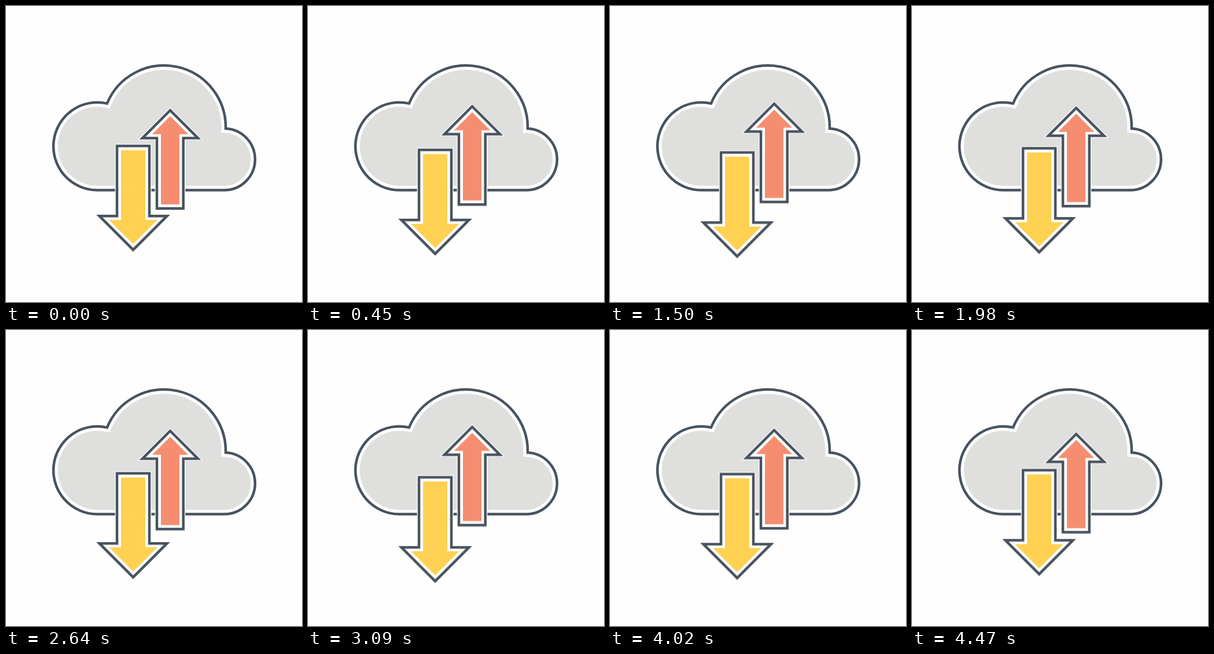
Write an HTML page without scripts that moves like this. It is 512 by 512 pixels and loops after 4500 ms.

```html
<!DOCTYPE html>
<html lang="en">
<head>
<meta charset="utf-8">
<title>Cloud transfer</title>
<style>
  html, body { margin: 0; width: 100%; height: 100%; overflow: hidden; background: #fefefe; }
  svg { display: block; width: 100%; height: 100%; }
  .line { fill: none; stroke: #48535e; stroke-width: 4.5; }
  .halo { fill: #fefefe; stroke: #fefefe; stroke-width: 7; }
  .cloud { fill: #dfe0de; stroke: #fefefe; stroke-width: 15; }
  .arrow { animation: drift 1125ms linear infinite alternate; }
  .down { --shift: 17px; fill: #ffd152; }
  .up { --shift: -17px; fill: #f58e70; }
  @keyframes drift { to { transform: translateY(var(--shift)); } }
</style>
</head>
<body>
<svg viewBox="0 0 512 512">
  <defs>
    <path id="cloud" d="M157.2 318.5A75.9 75.9 0 1 1 174.8 168.6A106.7 106.7 0 0 1 380 212A53.28 53.28 0 0 1 378 318.5Z"/>
    <path id="down" d="M192 242H248V363.2H278.5L220 421.7L161.5 363.2H192Z"/>
    <path id="up" d="M261 350.2H306.7V228.6H332.1L284 180.5L235.9 228.6H261Z"/>
  </defs>

  <use href="#cloud" class="cloud"/>
  <use href="#cloud" class="line"/>

  <g class="arrow down">
    <use href="#down" class="halo"/>
    <use href="#down" class="line"/>
    <path d="M199 249.2H241V370.1H261.7L220 411.8L178.3 370.1H199Z"/>
  </g>

  <g class="arrow up">
    <use href="#up" class="halo"/>
    <use href="#up" class="line"/>
    <path d="M268 343.3H300V221.7H315.2L284 190.5L252.8 221.7H268Z"/>
  </g>
</svg>
</body>
</html>
```
